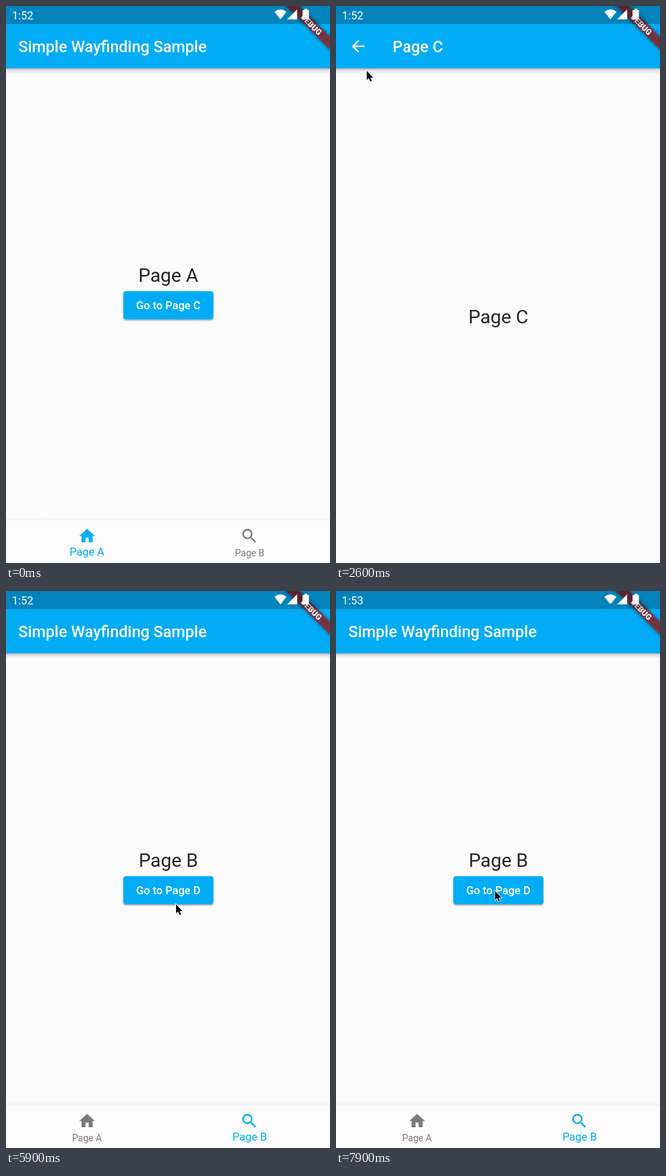
Animation of 484x832 px, one loop 8 s. Source, as an HTML page:

```html
<!DOCTYPE html>
<html lang="en">
<head>
<meta charset="utf-8">
<title>Tab navigation demo</title>
<style>
  html, body { margin: 0; width: 100%; height: 100%; overflow: hidden; background: #fbfbfb; }
  svg { display: block; width: 100vw; height: 100vh; font-family: Roboto, sans-serif; }
  .bar { font-size: 23.6px; font-weight: 500; fill: #fff; }
  .heading { font-size: 28.3px; fill: #242424; text-anchor: middle; }
  .button { font-size: 16.5px; font-weight: 500; fill: #fff; text-anchor: middle; }
  .label { text-anchor: middle; }
</style>
</head>
<body>
<svg viewBox="0 0 484 832">
  <defs>
    <filter id="blur" x="-20%" y="-60%" width="140%" height="220%"><feGaussianBlur stdDeviation="2.6"/></filter>
    <filter id="lift" x="-10%" y="-20%" width="120%" height="150%">
      <feDropShadow dx="0" dy="1.6" stdDeviation="1.3" flood-opacity=".36"/>
    </filter>
    <linearGradient id="barShade" x2="0" y2="1">
      <stop stop-opacity=".3"/><stop offset=".4" stop-opacity=".1"/><stop offset="1" stop-opacity="0"/>
    </linearGradient>
    <linearGradient id="navShade" x2="0" y2="1">
      <stop stop-opacity="0"/><stop offset="1" stop-opacity=".035"/>
    </linearGradient>
  </defs>

  <rect width="484" height="832" fill="#fbfbfb"/>
  <rect y="93" width="484" height="8" fill="url(#barShade)"/>
  <rect width="484" height="93" fill="#02acf5"/>

  <g id="home">
    <text class="bar" x="18.5" y="69">Simple Wayfinding Sample</text>
    <g id="pageA"></g>
    <g id="pageB"></g>
    <g id="pageD"></g>
    <rect y="763" width="484" height="5" fill="url(#navShade)"/>
    <rect y="768" width="484" height="64" fill="#fcfcfc"/>
    <g id="tabA">
      <path transform="translate(107 777.5) scale(1.178)" d="M10 20v-6h4v6h5v-8h3L12 3 2 12h3v8z"/>
      <text class="label" x="121">Page A</text>
    </g>
    <g id="tabB">
      <path transform="translate(349.4 777.5) scale(1.178)" d="M15.5 14h-.79l-.28-.27A6.47 6.47 0 0 0 16 9.5 6.5 6.5 0 1 0 9.5 16c1.61 0 3.09-.59 4.23-1.57l.27.28v.79l5 4.99L20.49 19zm-6 0a4.5 4.5 0 1 1 0-9 4.5 4.5 0 0 1 0 9z"/>
      <text class="label" x="364">Page B</text>
    </g>
  </g>

  <g id="pageC">
    <path transform="translate(18.9 46) scale(1.178)" fill="#fff" d="M20 11H7.83l5.59-5.59L12 4l-8 8 8 8 1.41-1.41L7.83 13H20z"/>
    <text class="bar" x="84.5" y="69">Page C</text>
    <text class="heading" x="242.5" y="473.5">Page C</text>
  </g>

  <g transform="translate(484 0) rotate(45)">
    <rect x="-60" y="32.3" width="120" height="14.1" opacity=".5" filter="url(#blur)"/>
    <rect x="-60" y="32.3" width="120" height="14.1" fill="#b71c1c" opacity=".63"/>
    <text y="43.6" text-anchor="middle" font-size="12" font-weight="900" fill="#fff">DEBUG</text>
  </g>

  <rect width="484" height="27" opacity=".24"/>
  <g fill="#fff">
    <text id="clock" x="9" y="19.5" font-size="16.5"></text>
    <path d="M401 8.5Q410 1.500 419 8.500L410 20z"/>
    <path d="M435 5V20H420z"/>
    <path d="M446 4h4v2h2.500v14h-9.500V6h3z"/>
  </g>

  <path id="cursor" d="M1 1v13.500l3-2.700 2.200 4.900 2.300-1-2.200-4.700h4.200z" stroke="#fff" stroke-width="1.600" paint-order="stroke"/>
</svg>

<script>
const LOOP = 8000, STEP = 100;
const BLUE = [2, 172, 245], GREY = [122, 122, 122];
const $ = id => document.getElementById(id);
const mix = (a, b, p) => a + (b - a) * p;
const ramp = (t, start, length) => Math.min(1, Math.max(0, (t - start) / length));
const fade = (id, opacity) => $(id).setAttribute('opacity', opacity);

// Pointer stops: time, x, y
const pointerPath = [
  [700, 480, 600], [1200, 265, 478], [1400, 258, 453], [1900, 258, 453],
  [2400, 62, 124], [2600, 45, 96], [2800, 29, 58], [3500, 29, 58],
  [4000, 321, 746], [4200, 321, 746], [4700, 354.5, 791.5], [5400, 354.5, 791.5],
  [5900, 253, 467], [6200, 249, 455.5], [7000, 249, 455.5],
  [7300, 232.5, 441], [7400, 232.5, 441], [7600, 236.5, 447]
];

function buildPage(id, heading, action, width) {
  $(id).innerHTML = `<text class="heading" x="242.500" y="411.500">${heading}</text>
    <rect x="${242.5 - width / 2}" y="426" width="${width}" height="42" rx="4" fill="#02acf5" filter="url(#lift)"/>
    <text class="button" x="242.500" y="453.300">${action}</text>`;
}

function styleTab(id, active) {
  $(id).setAttribute('fill', `rgb(${GREY.map((c, i) => mix(c, BLUE[i], active))})`);
  const label = $(id).querySelector('text');
  label.setAttribute('font-size', mix(14.1, 16.5, active));
  label.setAttribute('y', mix(822, 821, active));
}

function movePointer(t) {
  const next = pointerPath.findIndex(stop => stop[0] > t);
  const to = pointerPath.at(next);
  const from = next > 0 ? pointerPath[next - 1] : to;
  const p = ramp(t, from[0], to[0] - from[0] || 1);
  $('cursor').setAttribute('transform', `translate(${mix(from[1], to[1], p)} ${mix(from[2], to[2], p)})`);
  fade('cursor', t < pointerPath[0][0] ? 0 : 1);
}

function render(t) {
  const detail = ramp(t, 1600, 300) - ramp(t, 2900, 300);
  const tabB = ramp(t, 4900, 200);
  const pageD = ramp(t, 6400, 200) - ramp(t, 7700, 200);
  fade('home', 1 - detail);
  fade('pageC', detail);
  fade('pageA', 1 - tabB);
  fade('pageB', tabB * (1 - pageD));
  fade('pageD', pageD);
  styleTab('tabA', 1 - tabB);
  styleTab('tabB', tabB);
  $('clock').textContent = t < 7100 ? '1:52' : '1:53';
  movePointer(t);
}

buildPage('pageA', 'Page A', 'Go to Page C', 134.5);
buildPage('pageB', 'Page B', 'Go to Page D', 134.5);
buildPage('pageD', 'Page D', 'Go back', 98);

const start = performance.now();
function tick() {
  const elapsed = (performance.now() - start) % LOOP;
  render(Math.floor(elapsed / STEP) * STEP);
  requestAnimationFrame(tick);
}
tick();
</script>
</body>
</html>
```
